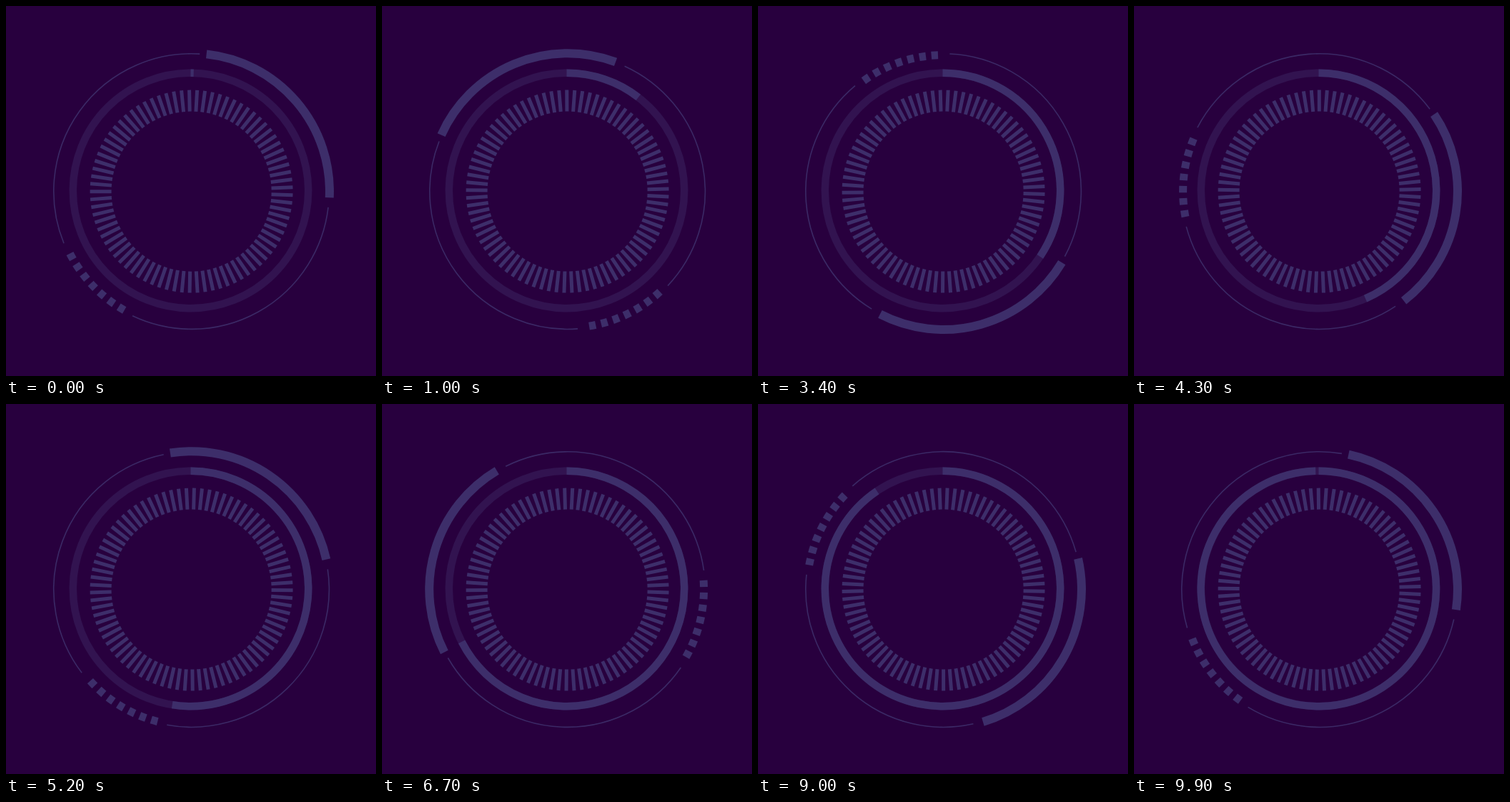
Recreate the animation shown at these times as an HTML page. Size 518 by 518 pixels, loop 10 s.

```html
<!DOCTYPE html>
<html lang="en">
<head>
<meta charset="utf-8">
<title>Dial loader</title>
<style>
  html, body { margin: 0; width: 100%; height: 100%; overflow: hidden; background: #28003e; }
  svg { display: block; width: 100vw; height: 100vh; }
  path { fill: none; stroke: #3d2e6a; }
</style>
</head>
<body>
<svg viewBox="0 0 518 518">
  <g id="rotor"></g>
  <path id="ticks" stroke-width="5"/>
  <circle cx="258.5" cy="258.5" r="164.7" fill="none" stroke="#321350" stroke-width="10.5"/>
  <path id="progress" stroke-width="10.5"/>
</svg>
<script>
const LOOP = 10000, STEP = 100;
const FIRST = 0.0041, SPAN = 0.9918;
const CENTER = 259.6, RING_CENTER = 258.5;
const TICKS = 81, TICK_ANGLE = 360 / TICKS;

const rotor = document.getElementById("rotor");
const ticks = document.getElementById("ticks");
const progress = document.getElementById("progress");

// Angles are in degrees, clockwise from the top.
function point(center, radius, angle) {
  const a = angle * Math.PI / 180;
  return `${(center + radius * Math.sin(a)).toFixed(2)} ${(center - radius * Math.cos(a)).toFixed(2)}`;
}

function arc(center, radius, from, to) {
  const large = to - from > 180 ? 1 : 0;
  return `M${point(center, radius, from)}A${radius} ${radius} 0 ${large} 1 ${point(center, radius, to)}`;
}

function addArc(radius, from, to, width, opacity = 1) {
  const path = document.createElementNS("http://www.w3.org/2000/svg", "path");
  path.setAttribute("d", arc(CENTER, radius, from, to));
  path.setAttribute("stroke-width", width);
  path.setAttribute("stroke-opacity", opacity);
  rotor.append(path);
}

addArc(193.4, 9.2, 95.5, 12);
addArc(192.8, 99.6, 208.3, 1.6, 0.9);
addArc(192.8, 250.8, 366.4, 1.6, 0.9);
for (let i = 0; i < 7; i++) {
  const middle = 213.8 + i * 5.12;
  addArc(191, middle - 1.4, middle + 1.4, 11);
}

let tickPath = "";
for (let i = 0; i < TICKS; i++) {
  const angle = i * TICK_ANGLE;
  tickPath += `M${point(CENTER, 112, angle)}L${point(CENTER, 142, angle)}`;
}
ticks.setAttribute("d", tickPath);

function spin(element, angle) {
  element.setAttribute("transform", `rotate(${angle.toFixed(3)} ${CENTER} ${CENTER})`);
}

function draw(time) {
  const step = Math.floor((time % LOOP) / STEP);
  const u = FIRST + SPAN * step / (LOOP / STEP - 1);
  spin(rotor, -720 * u);
  spin(ticks, TICK_ANGLE * (-0.2 - 18 * u));
  progress.setAttribute("d", arc(RING_CENTER, 164.7, 0, 360 * u));
}

const start = performance.now();
function frame() {
  draw(performance.now() - start);
  requestAnimationFrame(frame);
}
frame();
</script>
</body>
</html>
```
